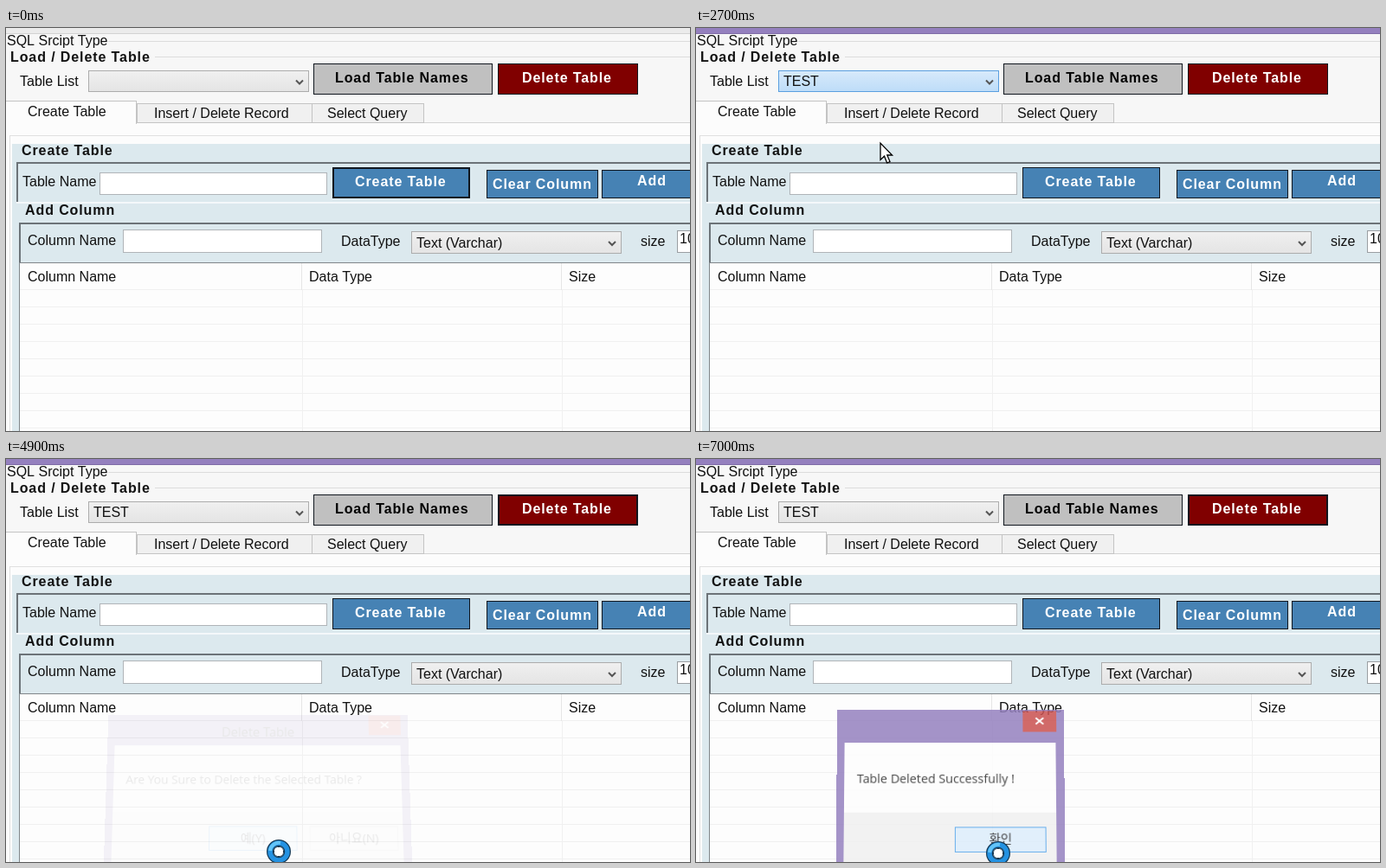
Animation of 790 by 466 pixels, one loop 7.1 s. Source, as an HTML page with a canvas:

```html
<!DOCTYPE html>
<html lang="en">
<head>
<meta charset="utf-8">
<title>Delete Table</title>
<style>
html, body { margin: 0; width: 100%; height: 100%; overflow: hidden; background: #f7f7f7; }
canvas, .dialog, .cursor { position: absolute; }
canvas { left: 0; top: 0; }
.dialog { top: 287px; height: 192px; box-sizing: border-box; background: #9480be;
  font: 14.7px "Open Sans", "Noto Sans CJK KR", sans-serif; color: #222; line-height: 20px; white-space: nowrap; }
.dialog > * { position: absolute; box-sizing: border-box; }
.panel { left: 9px; right: 10px; top: 39px; bottom: 9px; background: linear-gradient(#fdfdfd 83px, #f0f0f0 83px); }
.title { left: 0; right: 0; top: 12px; text-align: center; font-size: 15.8px; }
.close { right: 9px; top: 1px; width: 40px; height: 25px; background: #c9504f; }
.close::before, .close::after { content: ""; position: absolute; left: 14px; top: 11px; width: 12px; height: 2px;
  background: #fff; transform: rotate(40deg); }
.close::after { transform: rotate(-40deg); }
.message { left: 24px; top: 71px; }
.button { top: 139px; width: 108px; height: 30px; border: 1px solid #c8c8c8; background: #eee;
  text-align: center; line-height: 26px; }
.default { border-color: #4a9fe8; }
.hot { background: #dcecfb; }
.cursor { left: 0; top: 0; overflow: visible; }
</style>
</head>
<body>
<canvas id="form" width="790" height="466"></canvas>
<div class="dialog" id="confirm" style="left:104px;width:374px">
  <div class="title">Delete Table</div><div class="close"></div><div class="panel"></div>
  <div class="message">Are You Sure to Delete the Selected Table ?</div>
  <div class="button default" style="left:127px">예(Y)</div>
  <div class="button" style="left:250px">아니요(N)</div>
</div>
<div class="dialog" id="done" style="left:159px;width:270px">
  <div class="close"></div><div class="panel"></div>
  <div class="message">Table Deleted Successfully !</div>
  <div class="button default" style="left:140px">확인</div>
</div>
<svg class="cursor" id="cursor" width="1" height="1">
  <path id="arrow" d="M0 0V19.5L4.5 15.2L7.6 23L11 21.6L7.8 14H13.6Z" fill="#fff" stroke="#000" stroke-width="1.3"/>
  <g id="busy">
    <circle r="10" fill="none" stroke="#173a55" stroke-width="8"/>
    <circle r="10" fill="none" stroke="#2492e2" stroke-width="5.5"/>
    <path d="M-10 -1A10 10 0 0 1 2 -10" fill="none" stroke="#63c4f7" stroke-width="4"/>
    <rect x="-5.5" y="-5.5" width="11" height="11" rx="4" fill="#fff" stroke="#173a55"/>
  </g>
</svg>
<script>
const LOOP = 7100, STEP = 100;
const PANEL = "#dce9ee";
const $ = id => document.getElementById(id);
const ctx = $("form").getContext("2d");

// Pointer path: time, x, y
const path = [
  [100, 690, 470], [400, 590, 250], [800, 470, 64], [1200, 462, 64], [1600, 307, 65], [1800, 309, 66],
  [2100, 225, 85], [2400, 205, 140], [2600, 207, 139], [2700, 213, 133], [3200, 600, 66], [3400, 609, 64],
  [4000, 609, 64], [4500, 315, 440], [4700, 315, 454], [5100, 315, 454], [5500, 295, 434],
  [5900, 275, 420], [6500, 345, 445], [6800, 349, 456], [7100, 349, 456]
];

const clamp = v => Math.max(0, Math.min(1, v));
const within = (t, a, b) => t >= a && t < b;

function fill(color, x, y, w, h) {
  ctx.fillStyle = color;
  ctx.fillRect(x, y, w, h);
}

function box(x, y, w, h, color, edge, width = 1) {
  fill(edge, x, y, w, h);
  fill(color, x + width, y + width, w - 2 * width, h - 2 * width);
}

// Sunken edge along the top and left
function sunken(x, y, h) {
  fill("#6c7378", x, y, 790 - x, 2);
  fill("#6c7378", x, y, 2, h);
}

function text(str, x, y, bold, color = "#111") {
  ctx.font = (bold ? "bold " : "") + '16px "Liberation Sans", Arial, sans-serif';
  ctx.letterSpacing = bold ? "0.9px" : "0px";
  ctx.fillStyle = color;
  ctx.fillText(str, x, y);
}

function button(label, x, y, w, h, color, textX, textY, textColor, focused) {
  box(x, y, w, h, color, "#10161e", focused ? 2 : 1);
  text(label, textX, textY, true, textColor);
}

function combo(label, x, y, w, h, top, bottom, edge) {
  const shade = ctx.createLinearGradient(0, y, 0, y + h);
  shade.addColorStop(0, top);
  shade.addColorStop(1, bottom);
  box(x, y, w, h, shade, edge);
  text(label, x + 6, y + h - 7);
  ctx.strokeStyle = "#555";
  ctx.lineWidth = 2;
  ctx.beginPath();
  ctx.moveTo(x + w - 15, y + h / 2 - 1);
  ctx.lineTo(x + w - 11, y + h / 2 + 3);
  ctx.lineTo(x + w - 7, y + h / 2 - 1);
  ctx.stroke();
}

function drawForm(t) {
  const active = within(t, 1000, 3500) || within(t, 4800, 5200) || t >= 6900;
  fill("#f7f7f7", 0, 0, 790, 466);
  fill(active ? "#9480be" : "#ebebeb", 0, 0, 790, 6);
  fill(active ? "#7e6ba6" : "#d2d2d2", 0, 6, 790, 1);

  fill("#dcdcdc", 118, 15, 672, 1);
  fill("#dcdcdc", 172, 33, 618, 1);
  text("SQL Srcipt Type", 1, 20);
  text("Load / Delete Table", 5, 39, true);
  text("Table List", 16, 67);

  const selected = t >= 2300 ? "TEST" : "";
  const shades = within(t, 1800, 3400) ? ["#d8eafb", "#bddcf8", "#5a9fe0"]
    : within(t, 1500, 1800) ? ["#eff6fe", "#dcebfb", "#8db8e4"]
    : ["#f0f0f0", "#e4e4e4", "#acacac"];
  combo(selected, 95, 49, 255, 25, ...shades);
  button("Load Table Names", 355, 41, 207, 36, "#c0c0c0", 380, 63, "#000", within(t, 1000, 1800));
  button("Delete Table", 568, 41, 162, 36, "#800000", 596, 63, "#fff", t >= 3400);

  // Tabs
  fill("#fcfcfc", 0, 110, 790, 356);
  fill("#d4d4d4", 0, 109, 790, 1);
  box(151, 87, 203, 23, "#f0f0f0", "#c4c4c4");
  box(353, 87, 130, 23, "#f0f0f0", "#c4c4c4");
  box(-1, 84, 152, 27, "#fcfcfc", "#c4c4c4");
  fill("#fcfcfc", 0, 109, 150, 3);
  text("Create Table", 25, 102);
  text("Insert / Delete Record", 171, 104);
  text("Select Query", 371, 104);

  // Create and column groups
  fill("#e0e0e0", 4, 124, 786, 1);
  fill("#e0e0e0", 4, 124, 1, 342);
  fill(PANEL, 7, 134, 783, 332);
  text("Create Table", 18, 147, true);
  sunken(12, 155, 46);
  fill("#f4f8fa", 12, 201, 778, 2);
  text("Add Column", 22, 216, true);
  sunken(15, 225, 46);

  text("Table Name", 19, 183);
  box(108, 167, 263, 26, "#fff", "#b0b4b8");
  button("Create Table", 377, 161, 159, 36, "#4682b4", 403, 183, "#fff", t < 1000);
  button("Clear Column", 555, 164, 129, 33, "#4682b4", 562, 186, "#fff");
  button("Add", 688, 164, 120, 33, "#4682b4", 729, 182, "#fff");
  text("Column Name", 25, 251);
  box(135, 233, 230, 27, "#fff", "#b0b4b8");
  text("DataType", 387, 252);
  combo("Text (Varchar)", 468, 235, 243, 26, "#f0f0f0", "#e4e4e4", "#acacac");
  text("size", 733, 252);
  box(775, 234, 40, 26, "#fff", "#9a9ea2");
  text("10", 778, 249);

  // Grid
  box(15, 271, 790, 220, "#fdfdfd", "#80868a");
  for (let y = 303; y < 466; y += 20) fill("#f0f0f0", 16, y - 1, 774, 1);
  for (const x of [341, 641]) {
    fill("#e6e6e6", x, 272, 1, 31);
    fill("#f0f0f0", x + 1, 303, 1, 163);
  }
  text("Column Name", 25, 293);
  text("Data Type", 350, 293);
  text("Size", 650, 293);

  if (within(t, 1900, 2300)) {
    box(95, 74, 255, 22, "#fff", "#777");
    fill("#3399ff", 96, 75, 253, 20);
    text("TEST", 101, 91, false, "#fff");
  }
}

// Dialogs tilt in with the lower edge away and leave with the upper edge away
function drawDialog(id, t, openAt, closeAt, hotAt) {
  const opening = clamp((t - openAt) / 300), closing = clamp((t - closeAt) / 240);
  const el = $(id), rest = 1 - opening, leave = Math.sqrt(closing);
  const angle = -15 * rest + 5.5 * leave;
  const scale = 1 - 0.105 * rest - 0.065 * leave;
  el.style.opacity = opening ** 1.2 * (1 - closing);
  el.style.transform =
    `translateY(${-5 * rest + leave}px) perspective(500px) rotateX(${angle}deg) scale(${scale})`;
  el.querySelector(".default").classList.toggle("hot", t >= hotAt);
}

function drawCursor(t) {
  const next = Math.max(1, path.findIndex(p => p[0] >= t));
  const [t0, x0, y0] = path[next - 1], [t1, x1, y1] = path[next];
  const k = clamp((t - t0) / (t1 - t0)), ease = k * k * (3 - 2 * k);
  const busy = within(t, 4800, 5200) || t >= 6900;
  $("cursor").style.transform = `translate(${x0 + (x1 - x0) * ease}px, ${y0 + (y1 - y0) * ease}px)`;
  $("cursor").style.display = t < 100 ? "none" : "";
  $("arrow").style.display = busy ? "none" : "";
  $("busy").style.display = busy ? "" : "none";
}

function render(now) {
  const t = Math.floor(now % LOOP / STEP) * STEP;
  drawForm(t);
  drawDialog("confirm", t, 3600, 4684, 4500);
  drawDialog("done", t, 5200, 6965, 6500);
  drawCursor(t);
}

const start = performance.now();
function frame() {
  render(performance.now() - start);
  requestAnimationFrame(frame);
}
frame();
</script>
</body>
</html>
```
